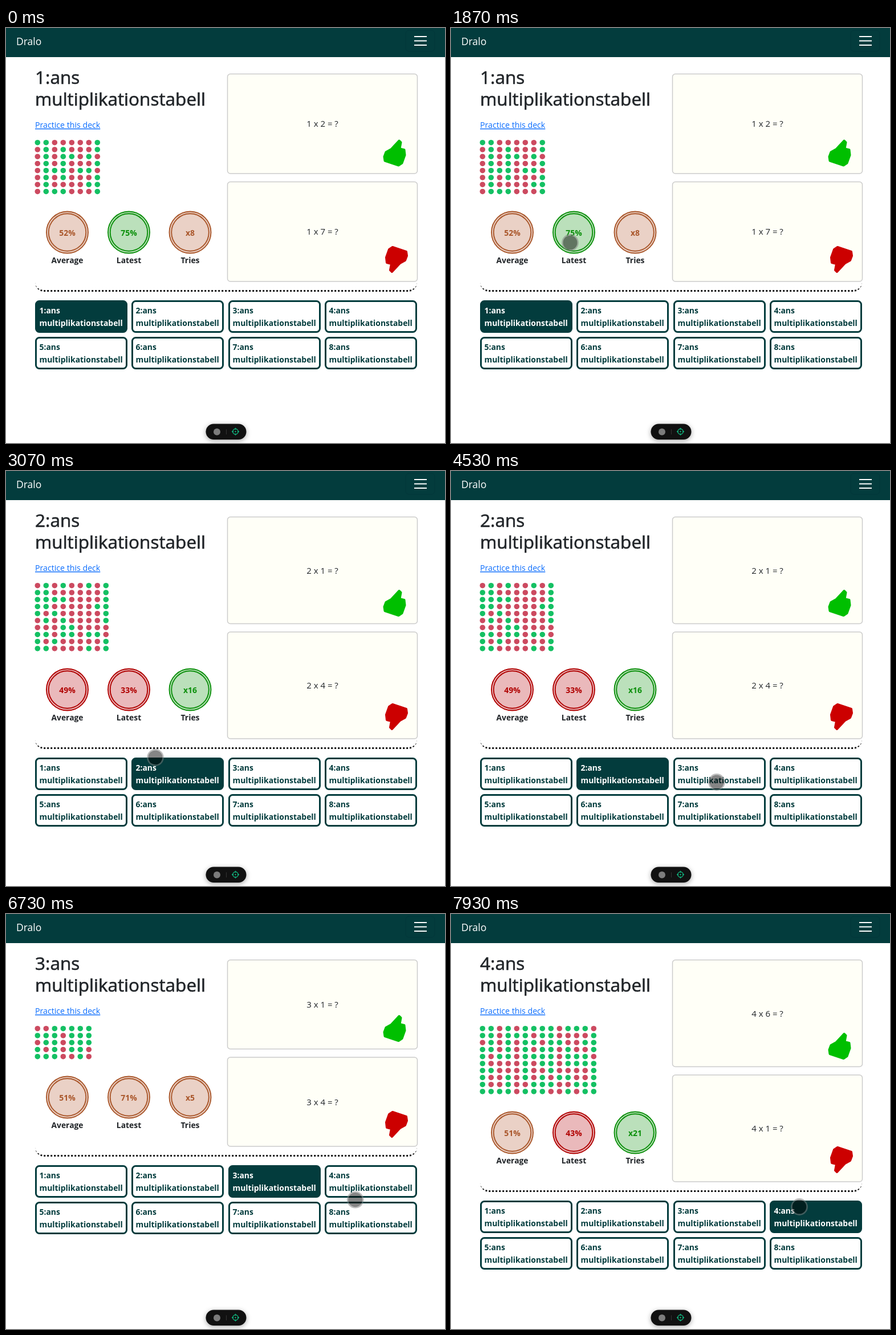
Write an HTML page that moves like this. It is 770 px wide and 727 px high and loops after 8 s.

```html
<!DOCTYPE html>
<html lang="sv">
<head>
<meta charset="utf-8">
<title>Multiplikationstabell</title>
<style>
html, body { margin: 0; width: 100%; height: 100%; overflow: hidden; background: #fff; }
svg, section { position: absolute; left: 0; top: 0; width: 770px; height: 727px; }
text { font: 400 15px "Open Sans", "Noto Sans", sans-serif; fill: #212529; }
text.title { font-size: 31.5px; stroke: #212529; stroke-width: .6; }
text.link { font-size: 14.2px; fill: #0d6efd; text-decoration: underline; }
text.bold { font-size: 13.9px; font-weight: 700; }
text.mid { text-anchor: middle; }
text.brand { font-size: 17.5px; fill: #fff; }
.card { fill: #fffff7; stroke: #ccc; stroke-width: 1.5; }
.thumb { stroke-width: 4; stroke-linejoin: round; }
.deck { fill: #fff; stroke: #033c3d; stroke-width: 3; }
.deck.on { fill: #033c3d; }
.rule {
  position: absolute; left: 51px; width: 670px; height: 30px; box-sizing: border-box;
  border-bottom: 3px dotted #111; border-radius: 0 0 16px 16px;
}
.pill { filter: drop-shadow(0 2px 4px rgba(0,0,0,.35)); }
</style>
</head>
<body>
<main></main>
<svg viewBox="0 0 770 727">
  <rect width="770" height="51" fill="#033c3d"/>
  <text class="brand" x="18" y="30">Dralo</text>
  <rect x="701" y="4" width="51" height="37" rx="6" fill="none" stroke="#02363a"/>
  <path d="M716 15h22M716 22.5h22M716 30h22" stroke="#fff" stroke-width="1.9"/>
  <rect class="pill" x="350.5" y="693.5" width="71" height="27.5" rx="13.75" fill="#111"/>
  <circle cx="370" cy="707.5" r="6" fill="#7c7c7c"/>
  <path d="M386.5 703v9" stroke="#333"/>
  <g fill="none" stroke="#10b981" stroke-width="1.4">
    <circle cx="402.5" cy="707" r="4.7"/>
    <path d="M402.5 700.5v3M402.5 710.5v3M396 707h3M406 707h3"/>
    <circle cx="402.5" cy="707" r=".5"/>
  </g>
  <g id="cursor">
    <circle r="12.6" fill="#000" fill-opacity=".48"/>
    <circle r="13.6" fill="none" stroke="#808080" stroke-opacity=".5" stroke-width="2.6"/>
  </g>
</svg>
<script>
const FPS = 15, LOOP = 8000;
const BROWN = '#a9562a', GREEN = '#0a8f0a', RED = '#b00000';
const TINT = { [BROWN]: '#ead1c6', [GREEN]: '#bbe0bb', [RED]: '#eab9bb' };

// Habit: the usual outcome for each card, right or wrong. Ticks count 1/15 s.
const DECKS = [
  { tick: 0, best: 2, worst: 7, average: 52, latest: 75, tries: 8, habit: 'RGRGRRRG' },
  { tick: 45, best: 1, worst: 4, average: 49, latest: 33, tries: 16, habit: 'GGRRRRRRG' },
  { tick: 85, best: 1, worst: 4, average: 51, latest: 71, tries: 5, habit: 'GRGRGGG' },
  { tick: 114, best: 6, worst: 1, average: 51, latest: 43, tries: 21, habit: 'GGRGRGRGGRGRGG' }
];

const text = (x, y, s, cls = '', fill = '') =>
  `<text x="${x}" y="${y}" class="${cls}"${fill && ` style="fill:${fill}"`}>${s}</text>`;

function seeded(seed) {
  return () => (seed = (seed * 16807) % 2147483647) / 2147483647;
}

// Every try repeats the habit with some random slips.
function dots(habit, rows, seed) {
  const random = seeded(seed);
  let out = '';
  for (let j = 0; j < rows; j++) {
    [...habit].forEach((c, i) => {
      const right = (c === 'G') !== (random() < 0.2);
      out += `<circle cx="${55.3 + i * 15}" cy="${200.7 + j * 12.25}" r="4.8" fill="${right ? '#14c063' : '#cc4a60'}"/>`;
    });
  }
  return out;
}

const grade = percent => percent < 50 ? RED : percent < 75 ? BROWN : GREEN;

const badge = (value, color, label, x, y) =>
  `<g fill="${TINT[color]}" stroke="${color}" stroke-width="1.9">
    <circle cx="${x}" cy="${y}" r="36.5"/><circle cx="${x}" cy="${y}" r="32.8"/></g>` +
  text(x, y + 5.5, value, 'bold mid', color) + text(x, y + 54, label, 'bold mid');

// A tilted fist around its own centre, thumb at the upper right.
const thumb = (x, y, turn, color) =>
  `<path class="thumb" d="M8-21l3 3l-2 11l8 2l1 9l-5 14l-6 4l-24-8l-1-7l3-8l9-5z"
    fill="${color}" stroke="${color}" transform="translate(${x} ${y}) rotate(${turn})"/>`;

const card = (y, h, sum) =>
  `<rect class="card" x="388.5" y="${y}" width="333" height="${h}" rx="5"/>` +
  text(555, y + h / 2 + 5.5, sum, 'mid');

function deckButton(i, active, top) {
  const x = Math.round(51 + (i % 4) * 169.4), y = top + (i > 3 ? 64 : 0);
  const color = active ? '#fff' : '#033c3d';
  return `<rect class="deck${active ? ' on' : ''}" x="${x + 1.5}" y="${y + 1.5}" width="159" height="54" rx="6"/>` +
    text(x + 7.5, y + 22.5, `${i + 1}:ans`, 'bold', color) +
    text(x + 7.5, y + 45, 'multiplikationstabell', 'bold', color);
}

function page(deck, index) {
  const n = index + 1;
  const rows = Math.min(deck.tries, 10);
  const dy = Math.round((rows - 8) * 12.35);
  const h = 174.5 + dy / 2, lower = 269.5 + dy / 2, badgeY = 358 + dy;
  const section = document.createElement('section');
  section.innerHTML = `<svg viewBox="0 0 770 727">` +
    text(51, 97.5, `${n}:ans`, 'title') +
    text(51, 136, 'multiplikationstabell', 'title') +
    text(51, 175, 'Practice this deck', 'link') +
    dots(deck.habit, rows, n * 7919) +
    badge(`${deck.average}%`, grade(deck.average), 'Average', 107.5, badgeY) +
    badge(`${deck.latest}%`, grade(deck.latest), 'Latest', 215.5, badgeY) +
    badge(`x${deck.tries}`, deck.tries < 10 ? BROWN : GREEN, 'Tries', 323, badgeY) +
    card(80.5, h, `${n} x ${deck.best} = ?`) +
    thumb(681.5, 44 + h, 0, '#00bf00') +
    card(lower, h, `${n} x ${deck.worst} = ?`) +
    thumb(685, lower + h - 38, 180, '#cc0000') +
    Array.from({ length: 8 }, (_, i) => deckButton(i, i === index, 477 + dy)).join('') +
    `</svg><div class="rule" style="top:${432 + dy}px"></div>`;
  document.querySelector('main').append(section);
  return section;
}

// Pointer glides: first tick, last tick, and where it comes to rest.
const ENTRY = [25, 66];
const GLIDES = [
  [3, 9, 117, 164],
  [15, 17, 171, 213],
  [18, 22, 183, 226],
  [25, 28, 209, 376],
  [28, 35, 262, 502],
  [60, 62, 300, 488],
  [62, 68, 466, 545],
  [92, 105, 628, 496],
  [117, 119, 611, 513]
];

function pointer(tick) {
  let [x, y] = ENTRY;
  for (const [start, end, toX, toY] of GLIDES) {
    const p = Math.min(1, Math.max(0, (tick - start) / (end - start)));
    const eased = 1 - (1 - p) ** 2;
    x += (toX - x) * eased;
    y += (toY - y) * eased;
  }
  return [x, y];
}

const pages = DECKS.map(page);
const cursor = document.getElementById('cursor');

function draw(time) {
  // A few ms of slack, since times are rounded to 10 ms.
  const tick = Math.floor((time % LOOP + 5) * FPS / 1000);
  const current = DECKS.filter(d => d.tick <= tick).length - 1;
  pages.forEach((p, i) => p.style.display = i === current ? '' : 'none');
  cursor.style.display = tick < GLIDES[0][0] ? 'none' : '';
  cursor.setAttribute('transform', `translate(${pointer(tick)})`);
}

const begin = performance.now();
function frame() {
  draw(performance.now() - begin);
  requestAnimationFrame(frame);
}
frame();
</script>
</body>
</html>
```
